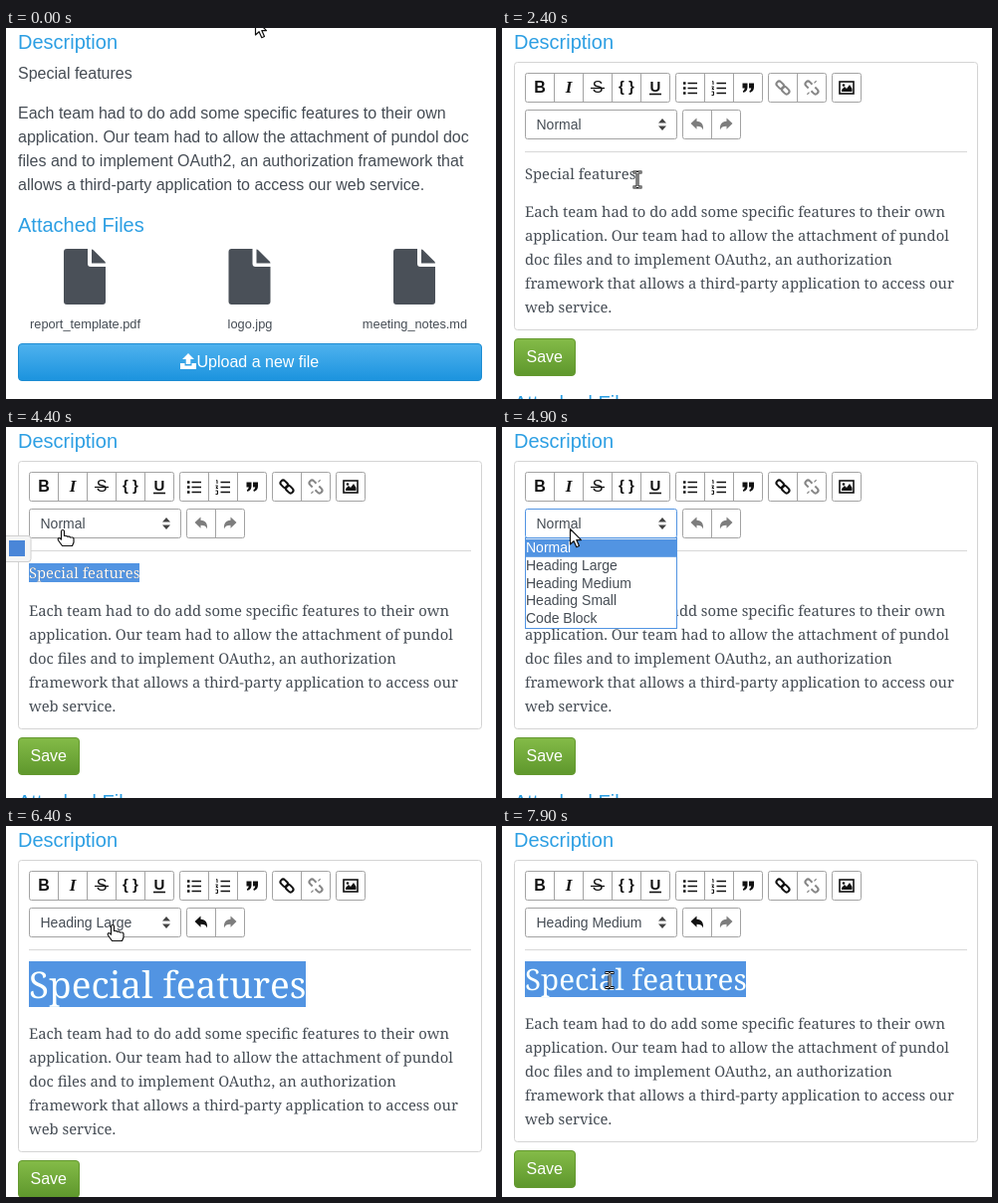
Write an HTML page that moves like this. It is 492x373 px and loops after 8000 ms.

```html
<!DOCTYPE html>
<html lang="en">
<head>
<meta charset="utf-8">
<title>Description editor</title>
<style>
html, body { margin: 0; width: 100%; height: 100%; overflow: hidden; background: #fff; }
svg { display: block; width: 492px; height: 373px; }
text { font: 16px "Liberation Sans", Arial, sans-serif; fill: #454c54; white-space: pre; }
.title { font-size: 20px; fill: #2d9fe3; }
.small { font-size: 12.8px; }
.menu { font-size: 14px; }
.white { fill: #fff; }
.mid { text-anchor: middle; }
.serif { font-family: "Noto Serif", Georgia, serif; font-variant-numeric: oldstyle-nums; text-rendering: geometricPrecision; }
.tool { font-weight: bold; fill: #111; text-anchor: middle; }
.frame { fill: #fff; stroke: #a3a3a3; }
.line { fill: none; stroke: #111; stroke-width: 1.6; }
.chain { fill: none; stroke: currentColor; stroke-width: 2; }
.cur { fill: #fff; stroke: #111; stroke-width: 1.2; stroke-linejoin: round; }
</style>
</head>
<body>
<svg id="stage" viewBox="0 0 492 373">
  <defs>
    <linearGradient id="blue" x2="0" y2="1"><stop stop-color="#4fb2ee"/><stop offset="1" stop-color="#1b93de"/></linearGradient>
    <linearGradient id="green" x2="0" y2="1"><stop stop-color="#84bb48"/><stop offset="1" stop-color="#5e972c"/></linearGradient>
    <clipPath id="clip"><rect class="sel"/></clipPath>
    <g id="file" fill="#4a5058">
      <path d="M3 0H24V15q0 3 3 3H42V53q0 3-3 3H3q-3 0-3-3V3q0-3 3-3Z"/>
      <path d="M28 .5q1 0 2 1L41 12.500q1 1 1 2H28Z"/>
    </g>
  </defs>
  <rect width="492" height="373" fill="#fff"/>
  <text class="title" x="12" y="21">Description</text>

  <g id="view">
    <text x="12" y="51">Special features</text>
    <g id="viewText"></g>
    <text class="title" x="12" y="205">Attached Files</text>
    <g id="files"></g>
    <rect x="12.5" y="317.5" width="465" height="37" rx="3.5" fill="url(#blue)" stroke="#1d8cd2"/>
    <path class="white" d="M183 327l6 6h-3.700v5h-4.600v-5H177ZM175 337h4.500v2.500h7V337h4.500v6h-16Z"/>
    <text class="white" x="191.500" y="341">Upload a new file</text>
  </g>

  <g id="editor">
    <rect id="box" x="12.500" y="34.500" width="465" rx="3" fill="#fff" stroke="#d4d4d4"/>
    <g id="groups"></g>
    <text class="tool" x="38" y="65">B</text>
    <text class="tool" x="67" y="65" style="font-family:'Liberation Serif',serif;font-style:italic;font-size:17px">I</text>
    <text class="tool" x="96" y="65" style="font-weight:400">S</text>
    <path class="line" d="M89 60.500h14" style="stroke-width:1.300"/>
    <text class="tool" x="125" y="64" style="font-size:15px">{ }</text>
    <text class="tool" x="154" y="64" style="font-size:15px">U</text>
    <path class="line" d="M148 66.500h12"/>
    <path class="line" d="M186.500 55.500h9.500M186.500 60.500h9.500M186.500 65.500h9.500M215.500 55.500h9.500M215.500 60.500h9.500M215.500 65.500h9.500"/>
    <path class="line" d="M182 55.500h2.500M182 60.500h2.500M182 65.500h2.500" style="stroke-width:2.500"/>
    <path class="line" d="M211 54l1-.5v3.500M210.500 59h2l-1.500 2.500h2M210.500 64h2v3.500h-2" style="stroke-width:1"/>
    <path id="quote" d="M241.500 55.500h5v4q0 4-4 5.500l-.7-1.500q1.700-.8 2-3h-2.300ZM248 55.500h5v4q0 4-4 5.500l-.7-1.500q1.700-.8 2-3H248Z" fill="#111"/>
    <g id="link"><g class="chain" transform="translate(282 60) rotate(45)">
      <rect x="-8" y="-2.700" width="8.500" height="5.400" rx="2.700"/><rect x="-.5" y="-2.700" width="8.500" height="5.400" rx="2.700"/>
    </g></g>
    <g color="#858585"><g class="chain" transform="translate(311 60) rotate(45)">
      <path d="M-2 -2.700H-5.300a2.700 2.700 0 0 0 0 5.400H-2M2 -2.700H5.300a2.700 2.700 0 0 1 0 5.400H2" />
      <path d="M-1.500 -5v-3M1.500 5v3" style="stroke-width:1.200"/>
    </g></g>
    <rect class="line" x="339" y="54" width="14" height="12"/>
    <path d="M341 64v-2l3-3 2 2 3-4 2.500 4v3Z" fill="#111"/><circle cx="343" cy="57.500" r="1.300" fill="#111"/>
    <rect id="select" class="frame" x="23.500" y="82.500" width="152" height="29" rx="2"/>
    <text id="choice" class="menu" x="34.500" y="102"></text>
    <path d="M157 95.500l4-4.500 4 4.500ZM157 98.500l4 4.500 4-4.500Z" fill="#444"/>
    <path id="undo" d="M189.500 96l6-5.500v3.300c5 0 7 3.500 6.500 8.700-1-2.800-3-3.800-6.500-3.800v3Z"/>
    <path d="M231.500 96l-6-5.500v3.300c-5 0-7 3.500-6.500 8.700 1-2.800 3-3.800 6.500-3.800v3Z" fill="#7d7d7d"/>
    <path d="M23 124.500H467" stroke="#d8d8d8"/>
    <rect class="sel" fill="#5294e2"/>
    <text id="head" class="serif" x="23">Special features</text>
    <text id="headSel" class="serif" x="23" clip-path="url(#clip)" style="fill:#fff">Special features</text>
    <g id="below">
      <g id="editText"></g>
      <rect x="12.500" y="312.500" width="61" height="37" rx="3.500" fill="url(#green)" stroke="#64992f"/>
      <text class="white" x="24.500" y="336">Save</text>
      <text class="title" x="12" y="383.500">Attached Files</text>
    </g>
    <g id="badge">
      <rect x="-3.500" y="109.500" width="28.500" height="26" rx="3" fill="#f5f5f5" stroke="#d0d0d0"/>
      <rect x="3" y="114" width="16" height="16" fill="#4a86d8"/>
    </g>
    <g id="list"></g>
  </g>

  <g id="cursor">
    <path id="arrow" class="cur" d="M.5 .5V16l3.600-3.300 2.700 6 2.700-1.200-2.700-5.900h4.700Z"/>
    <g id="beam" fill="none">
      <path d="M-4.500 -7.500h3.500l1 1 1-1h3.500M0 -7V7M-4.500 7.500h3.500l1-1 1 1h3.500" stroke="#111" stroke-width="3"/>
      <path d="M-4 -7.500h3l1 1 1-1h3M0 -7V7M-4 7.500h3l1-1 1 1h3" stroke="#fff" stroke-width=".9"/>
    </g>
    <path id="hand" class="cur" d="M-1.500 9V2q0-1.500 1.500-1.500T1.500 2v4.500h2.300l.7.700h2.300l.7.800h2.300q1.200 0 1.200 1.500v3.500l-1.500 3.500H-.5L-4.500 11q-.8-1.500.2-2.200T-1.500 10Z"/>
  </g>
</svg>
<script>
const $ = id => document.getElementById(id);
const show = (id, on) => $(id).style.display = on ? '' : 'none';
const set = (el, attrs) => { for (const k in attrs) el.setAttribute(k, attrs[k]); };

const lines = (text, x, y, cls = '') => text.map((s, i) =>
  `<text class="${cls}" x="${x}" y="${y + i * 24}">${s}</text>`).join('');

$('viewText').innerHTML = lines([
  'Each team had to do add some specific features to their own',
  'application. Our team had to allow the attachment of pundol doc',
  'files and to implement OAuth2, an authorization framework that',
  'allows a third-party application to access our web service.'
], 12, 91);

$('editText').innerHTML = lines([
  'Each team had to do add some specific features to their own',
  'application. Our team had to allow the attachment of pundol',
  'doc files and to implement OAuth2, an authorization',
  'framework that allows a third-party application to access our',
  'web service.'
], 23, 190, 'serif');

$('files').innerHTML = ['report_template.pdf', 'logo.jpg', 'meeting_notes.md'].map((name, i) => {
  const x = 79 + i * 165.5;
  return `<use href="#file" x="${x - 21}" y="222"/><text class="small mid" x="${x + .5}" y="302">${name}</text>`;
}).join('');

// Button groups: left edge, top edge, number of buttons
$('groups').innerHTML = [[23, 45, 5], [174, 45, 3], [267, 45, 2], [331, 45, 1], [181, 82, 2]].map(([x, y, n]) => {
  let s = `<rect class="frame" x="${x + .5}" y="${y + .5}" width="${n * 29}" height="29" rx="2"/>`;
  for (let i = 1; i < n; i++) s += `<path stroke="#a3a3a3" d="M${x + .5 + i * 29} ${y}v29"/>`;
  return s;
}).join('');

const options = ['Normal', 'Heading Large', 'Heading Medium', 'Heading Small', 'Code Block'];
$('list').innerHTML = '<rect x="23.500" y="111.500" width="152" height="91" fill="#fff" stroke="#5294e2"/>' +
  '<rect id="hover" x="24" width="151" height="18" fill="#5294e2"/>' +
  options.map((s, i) => `<text class="menu option" x="24" y="${126 + i * 17.75}">${s}</text>`).join('');

// The serif face runs wider than the layout's metrics, so one factor sizes all of it
const fontScale = 422 / document.querySelector('#editText text').getComputedTextLength();
document.querySelectorAll('#editText text').forEach(el => el.style.fontSize = 16 * fontScale + 'px');

const styles = [
  { size: 16, base: 152, top: 137, h: 19, right: 134, shift: 0, color: '#454c54' },
  { size: 40, base: 173, top: 136, h: 46, right: 301, shift: 24, color: '#2d9fe3' },
  { size: 32, base: 165, top: 136, h: 36, right: 245, shift: 14, color: '#2d9fe3' }
];

// Pointer path: time, x, y, shape
const path = [
  [0, 250, -9, 'arrow'], [100, 250, -9, 'arrow'], [700, 163, 103, 'arrow'],
  [900, 163, 103, 'arrow'], [1000, 164, 111, 'arrow'], [1600, 164, 111, 'arrow'],
  [1800, 156, 133, 'beam'], [1900, 156, 133, 'beam'], [2400, 136, 152.5, 'beam'],
  [2700, 136, 152.5, 'beam'], [3000, 146, 141, 'beam'], [3100, 146, 141, 'beam'],
  [4000, 15, 147, 'beam'], [4300, 51, 109, 'hand'], [4400, 57, 103, 'hand'],
  [4800, 68, 102, 'hand'], [4900, 68, 102, 'arrow'], [5500, 81, 136, 'arrow'],
  [5800, 81, 136, 'arrow'], [5900, 85, 140, 'beam'], [6000, 85, 140, 'beam'],
  [6300, 104, 104, 'hand'], [6400, 107, 99, 'hand'], [6800, 107, 99, 'arrow'],
  [6900, 107, 99, 'arrow'], [7100, 105.5, 121, 'arrow'], [7200, 168, 145, 'arrow'],
  [7300, 108, 159, 'arrow'], [7400, 108, 159, 'arrow'], [7700, 104, 149, 'arrow'],
  [7900, 108, 155, 'beam'], [8000, 108, 155, 'beam']
];

function pointer(t) {
  let i = path.length - 2;
  while (path[i][0] > t) i--;
  const [t0, x0, y0, shape] = path[i], [t1, x1, y1] = path[i + 1];
  const u = (t - t0) / (t1 - t0), e = u * u * (3 - 2 * u);
  return { x: x0 + (x1 - x0) * e, y: y0 + (y1 - y0) * e, shape };
}

const within = (t, a, b) => t >= a && t < b;

function draw(t) {
  const p = pointer(t);
  if (t >= 7800 && t < 7900) { p.x = 104; p.y = 149; }
  const editing = t >= 1000;
  show('view', !editing);
  show('editor', editing);

  const kind = t < 5800 ? 0 : t < 7900 ? 1 : 2;
  const s = styles[kind];
  set($('box'), { height: 269 + s.shift });
  set($('below'), { transform: `translate(0 ${s.shift})` });
  for (const id of ['head', 'headSel']) {
    set($(id), { y: s.base });
    $(id).style.fontSize = s.size * fontScale + 'px';
  }
  $('head').style.fill = s.color;

  let left = 23;
  if (t < 3200 || within(t, 6700, 7900)) left = s.right;
  else if (t < 4000) left = Math.max(23, Math.min(s.right, p.x));
  document.querySelectorAll('.sel').forEach(el =>
    set(el, { x: left, y: s.top, width: s.right - left, height: s.h }));

  const open = within(t, 4900, 5800) || within(t, 6800, 7900);
  const focus = within(t, 4800, 5800) || within(t, 6700, 7900);
  $('select').style.stroke = focus ? '#5294e2' : '';
  $('choice').textContent = options[kind];
  show('list', open);
  if (open) {
    const over = Math.floor((p.y - 113) / 17.75);
    const row = over < 0 ? kind : over;
    set($('hover'), { y: 112.8 + row * 17.75 });
    document.querySelectorAll('.option').forEach((el, i) => el.classList.toggle('white', i === row));
  }

  show('badge', within(t, 4100, 4900));
  set($('link'), { color: t < 4100 ? '#858585' : '#111' });
  set($('undo'), { fill: kind ? '#111' : '#7d7d7d' });

  set($('cursor'), { transform: `translate(${p.x} ${p.y})` });
  for (const id of ['arrow', 'beam', 'hand']) show(id, id === p.shape);
}

const start = performance.now();
function tick() {
  const t = (performance.now() - start) % 8000;
  draw(Math.floor(t / 100) * 100);
  requestAnimationFrame(tick);
}
tick();
</script>
</body>
</html>
```
